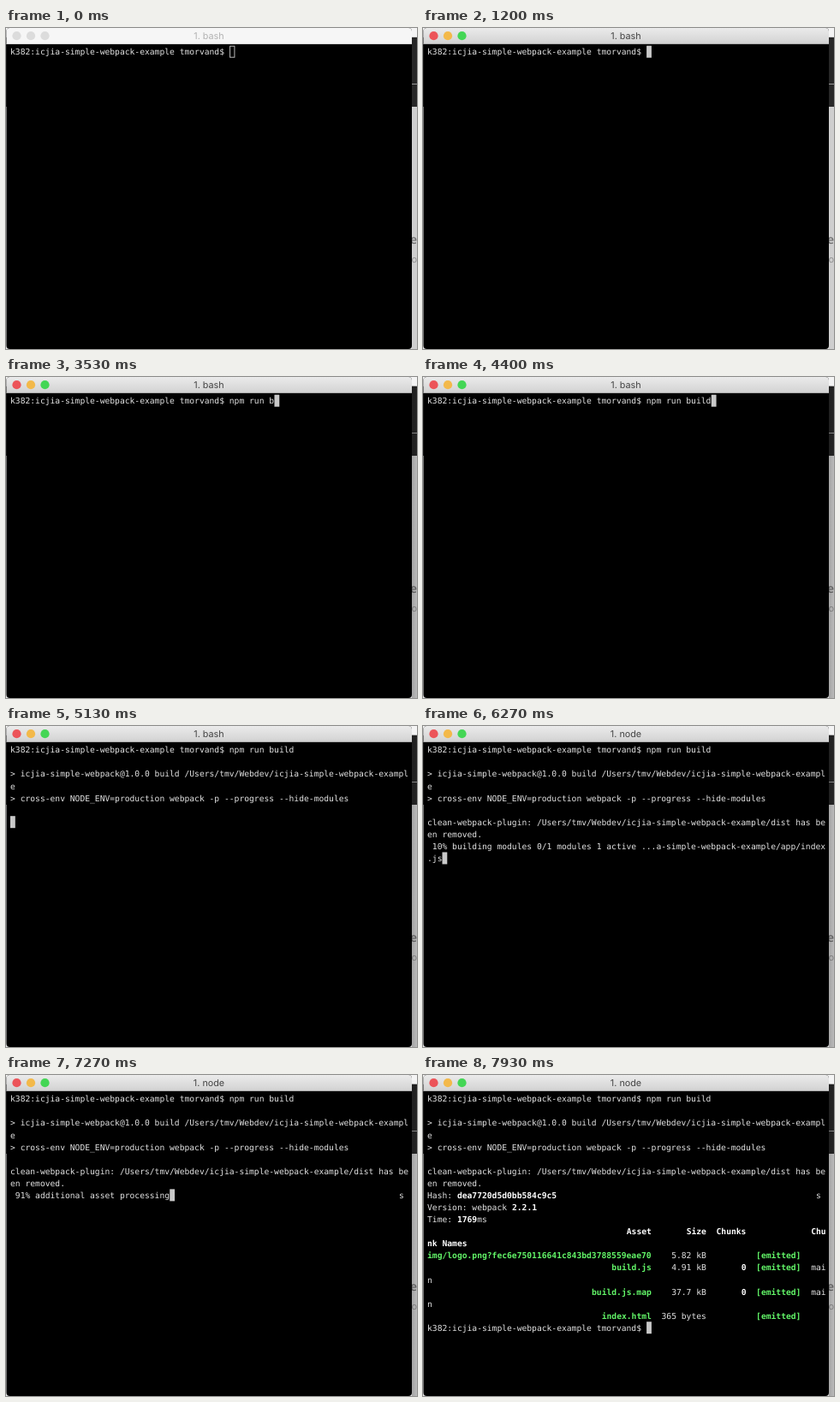
Animation of 480 by 375 pixels, one loop 8000 ms. Source, as an HTML page:

```html
<!DOCTYPE html>
<html lang="en">
<head>
<meta charset="utf-8">
<title>Terminal build</title>
<style>
  html, body { margin: 0; width: 100%; height: 100%; overflow: hidden; background: #000; }
  svg { display: block; width: 480px; height: 375px; }
  text { white-space: pre; text-rendering: geometricPrecision; }
  #screen { font: 9.67px "DejaVu Sans Mono", monospace; fill: #e2e2e2; }
  #screen .bold { font-weight: bold; fill: #fff; }
  #screen .green { font-weight: bold; fill: #62f568; }
  #title { font: 10.8px Inter, "Liberation Sans", sans-serif; text-anchor: middle; }
  .page { font-family: "Open Sans", sans-serif; }
</style>
</head>
<body>
<svg viewBox="0 0 480 375">
  <defs>
    <linearGradient id="bar" x2="0" y2="1">
      <stop stop-color="#ebebeb"/><stop offset="1" stop-color="#d2d2d2"/>
    </linearGradient>
    <linearGradient id="shade">
      <stop stop-color="#000" stop-opacity=".2"/><stop offset="1" stop-color="#000" stop-opacity=".1"/>
    </linearGradient>
  </defs>
  <g class="page">
    <rect width="480" height="375" fill="#e2e2e2"/>
    <rect y="11" width="480" height="81" fill="#2b2b2b"/>
    <rect x="474" y="65" width="6" height="1" fill="#a8a8a8"/>
    <text x="472" y="252" font-size="14" font-weight="600" fill="#777">e</text>
    <text x="473.5" y="274" font-size="11" fill="#999">o</text>
  </g>
  <rect x="474" width="6" height="375" fill="#000" opacity=".09"/>
  <rect id="shadow" x="474" width="6" height="375" fill="url(#shade)"/>
  <rect width="480" height="10" fill="#f4f4f4"/>
  <rect x=".5" width="473.5" height="375" rx="4" fill="#000"/>
  <path id="titlebar" d="M.5 18.5V4a4 4 0 0 1 4-4H470a4 4 0 0 1 4 4V18.5Z"/>
  <rect id="edge" x=".5" y="18" width="473.5" height="1"/>
  <g id="buttons">
    <circle cx="12.5" cy="9.2" r="5.1"/>
    <circle cx="29" cy="9.2" r="5.1"/>
    <circle cx="45.5" cy="9.2" r="5.1"/>
  </g>
  <text id="title" x="237" y="13.2"></text>
  <g id="screen"></g>
</svg>
<script>
const LOOP = 8000, FOCUS = 1200;
const LEFT = 5, TOP = 20.7, CELL = 5.82, LINE = 14.08;
const PROMPT = "k382:icjia-simple-webpack-example tmorvand$ ";
const COMMAND = "npm run build";
const KEY_TIMES = [2270, 2470, 2600, 2800, 3000, 3130, 3270, 3400, 3470, 3670, 3870, 4070, 4270];

const BUILD_HEAD = [
  "",
  "> icjia-simple-webpack@1.0.0 build /Users/tmv/Webdev/icjia-simple-webpack-exampl",
  "e",
  "> cross-env NODE_ENV=production webpack -p --progress --hide-modules"
];
const CLEANED = [
  "clean-webpack-plugin: /Users/tmv/Webdev/icjia-simple-webpack-example/dist has be",
  "en removed."
];
// Start time and the one or two rows of each progress message
const PROGRESS = [
  [6070, " 10% building modules 0/1 modules 1 active ...a-simple-webpack-example/app/index", ".js"],
  [6530, " 40% building modules 1/2 modules 1 active ...le-webpack-example/app/css/styles.", "css"],
  [6930, " 70% building modules 2/2 modules 0 active"],
  [7130, " 91% additional asset processing"],
  [7530, " 92% chunk asset optimization"],
  [7670, " 95% emitting"]
];
const LEFTOVER_FROM = 6930, STATS_AT = 7800;

const ASSETS = [
  ["img/logo.png?fec6e750116641c843bd3788559eae70", "5.82 kB"],
  ["build.js", "4.91 kB", "main"],
  ["build.js.map", "37.7 kB", "main"],
  ["index.html", "365 bytes"]
];

const el = id => document.getElementById(id);
const xAt = col => LEFT + col * CELL;
const yAt = row => TOP + row * LINE;

function makeScreen() {
  const parts = [];
  const put = (row, col, text, style = "") => {
    const safe = text.replace(/>/g, "&gt;");
    parts.push(`<text x="${xAt(col)}" y="${yAt(row) + 10.6}" class="${style}">${safe}</text>`);
  };
  const putRight = (row, end, text, style) => put(row, end - text.length, text, style);
  const cursor = (row, col, hollow) => {
    const paint = hollow ? 'fill="none" stroke="#b8b8b8"' : 'fill="#c9c9c9"';
    const inset = hollow ? .5 : 0;
    parts.push(`<rect x="${xAt(col) + inset}" y="${yAt(row) + inset}" width="${CELL - inset}" height="${14 - 2 * inset}" ${paint}/>`);
  };
  return { put, putRight, cursor, markup: () => parts.join("") };
}

function drawStats({ put, putRight }) {
  put(8, 0, "Hash:");
  put(8, 6, "dea7720d5d0bb584c9c5", "bold");
  put(9, 0, "Version: webpack");
  put(9, 17, "2.2.1", "bold");
  put(10, 0, "Time:");
  put(10, 6, "1769", "bold");
  put(10, 10, "ms");
  putRight(11, 45, "Asset", "bold");
  putRight(11, 56, "Size", "bold");
  putRight(11, 64, "Chunks", "bold");
  put(11, 77, "Chu", "bold");
  put(12, 0, "nk Names", "bold");
  let row = 13;
  for (const [name, size, chunk] of ASSETS) {
    putRight(row, 45, name, "green");
    putRight(row, 56, size);
    put(row, 66, "[emitted]", "green");
    if (chunk) {
      putRight(row, 64, "0", "bold");
      put(row, 77, chunk.slice(0, 3));
      put(++row, 0, chunk.slice(3));
    }
    row++;
  }
  put(row, 0, PROMPT);
  return row;
}

function drawScreen(t) {
  const screen = makeScreen();
  const { put, cursor } = screen;
  const typed = KEY_TIMES.filter(time => t >= time).length;
  put(0, 0, PROMPT + COMMAND.slice(0, typed));

  if (t >= 4930) BUILD_HEAD.forEach((line, i) => put(i + 1, 0, line));
  if (t >= 6000) CLEANED.forEach((line, i) => put(i + 6, 0, line));
  if (t >= LEFTOVER_FROM) put(8, 78, "s");

  const progress = PROGRESS.filter(([time]) => t >= time).pop();
  if (t >= STATS_AT) {
    cursor(drawStats(screen), PROMPT.length);
  } else if (progress) {
    const lines = progress.slice(1);
    lines.forEach((line, i) => put(8 + i, 0, line));
    cursor(7 + lines.length, lines[lines.length - 1].length);
  } else if (t >= 6000) cursor(8, 0);
  else if (t >= 4930) cursor(6, 0);
  else if (t >= 4670) cursor(1, 0);
  else cursor(0, PROMPT.length + typed, t < FOCUS);
  return screen.markup();
}

let lastMarkup = "";
function render(t) {
  const active = t >= FOCUS;
  el("shadow").setAttribute("opacity", Math.min(1, Math.max(0, (t - FOCUS) / 200)));
  el("titlebar").setAttribute("fill", active ? "url(#bar)" : "#f6f6f6");
  el("edge").setAttribute("fill", active ? "#aaa" : "#d5d5d5");
  ["#ec5459", "#f3b94a", "#44d655"].forEach((color, i) =>
    el("buttons").children[i].setAttribute("fill", active ? color : "#dcdcdc"));
  el("title").setAttribute("fill", active ? "#444" : "#b2b2b2");
  el("title").textContent = t < 5930 ? "1. bash" : "1. node";

  const markup = drawScreen(t);
  if (markup !== lastMarkup) el("screen").innerHTML = lastMarkup = markup;
}

const start = performance.now();
function tick() {
  render((performance.now() - start) % LOOP);
  requestAnimationFrame(tick);
}
tick();
</script>
</body>
</html>
```
